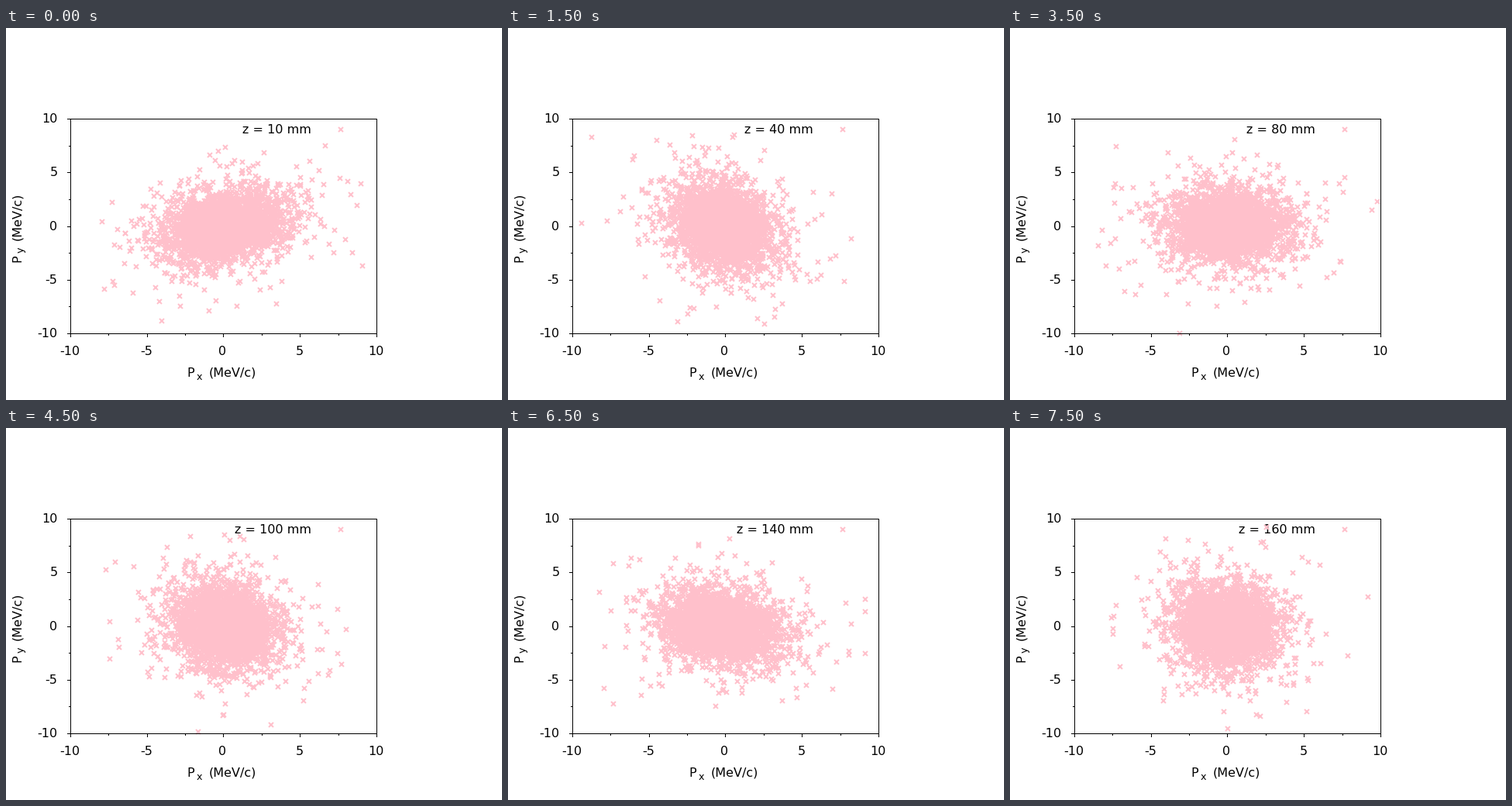
Write a matplotlib script that moves like this. It is 640 px wide and 480 px high and loops after 8 s.

```python
import numpy as np
import matplotlib.pyplot as plt
from matplotlib.animation import FuncAnimation

W, H, DPI = 640, 480, 100
PT = 72 / DPI  # points per pixel
FRAMES, STEP = 16, 500
LEFT, RIGHT, TOP, BOTTOM = 83, 478, 117, 394
PINK = "#ffc0cb"

plt.rcParams["font.family"] = "DejaVu Sans"
fig = plt.figure(figsize=(W / DPI, H / DPI), dpi=DPI, facecolor="white")
ax = fig.add_axes([0, 0, 1, 1])
ax.set_xlim(0, W)
ax.set_ylim(H, 0)
ax.axis("off")


def to_x(p):
    return LEFT + (p + 10) / 20 * (RIGHT - LEFT)


def to_y(p):
    return BOTTOM - (p + 10) / 20 * (BOTTOM - TOP)


def line(xs, ys):
    ax.plot(xs, ys, color="black", lw=PT, zorder=5,
            solid_capstyle="projecting", solid_joinstyle="miter")


def label(x, y, text, size=16, ha="left", angle=0):
    return ax.text(x, y, text, fontsize=size * PT, ha=ha, va="baseline",
                   rotation=angle, rotation_mode="anchor", zorder=2)


def axis_title(x, y, sub, angle=0):
    """Write P with a subscript and its unit along the given direction."""
    dx, dy = (0, -1) if angle else (1, 0)
    for text, along, drop, size in [("P", 0, 0, 16), (sub, 12.5, 4, 12.8),
                                    ("(MeV/c)", 28.5, 0, 16)]:
        label(x + along * dx - drop * dy, y + along * dy + drop * dx,
              text, size, angle=angle)


def crosses(x, y):
    return ax.plot(x, y, "x", color=PINK, ms=5.2 * PT, mew=2 * PT, zorder=3)[0]


# Frame, ticks and titles
line([LEFT, RIGHT, RIGHT, LEFT, LEFT], [TOP, TOP, BOTTOM, BOTTOM, TOP])
for i in range(9):
    p = -10 + 2.5 * i
    size = 2 if i % 2 else 4
    x, y = round(to_x(p)), round(to_y(p))
    line([x, x], [BOTTOM, BOTTOM + size])
    line([LEFT - size, LEFT], [y, y])
    if i % 2 == 0:
        label(x - 0.5, 422, f"{p:.0f}", ha="center")
        label(66.5, y + 5, f"{p:.0f}", ha="right")

axis_title(233, 450, "x")
axis_title(19, 302, "y", angle=90)
title = label(394, 136, "", ha="right")
crosses([432], [131])
cloud = crosses([], [])

# Beam: Gaussian core with a sparse halo, each particle turning at its own rate
rng = np.random.default_rng(12)
CORE, HALO = 3000, 200
radius = np.concatenate([1.6 * np.sqrt(-2 * np.log(1 - rng.random(CORE))),
                         3.9 + rng.exponential(1.7, HALO)])
phase = rng.uniform(0, 2 * np.pi, CORE + HALO)
rate = rng.uniform(1.2, 2.8, CORE + HALO)


def wave(k, period):
    return np.cos(2 * np.pi * k / period)


def draw(k):
    # The beam envelope breathes, tilts and sways along z
    breath = 0.08 * wave(k, 6.3)
    tilt = 0.22 * wave(k, 5.5)
    sway = 0.18 * wave(k, 8.5) - 0.05
    angle = phase + rate * k
    u, v = radius * np.cos(angle), radius * np.sin(angle)
    px = sway + (1.03 + breath) * u
    py = (1.05 - breath) * (tilt * u + np.sqrt(1 - tilt ** 2) * v)
    inside = (np.abs(px) <= 10) & (np.abs(py) <= 10)
    cloud.set_data(to_x(px[inside]), to_y(py[inside]))
    title.set_text(f"z = {10 * (k + 1)} mm")
    return cloud, title


anim = FuncAnimation(fig, draw, frames=FRAMES, interval=STEP, repeat=True,
                     repeat_delay=0, blit=False)
plt.show()
```
